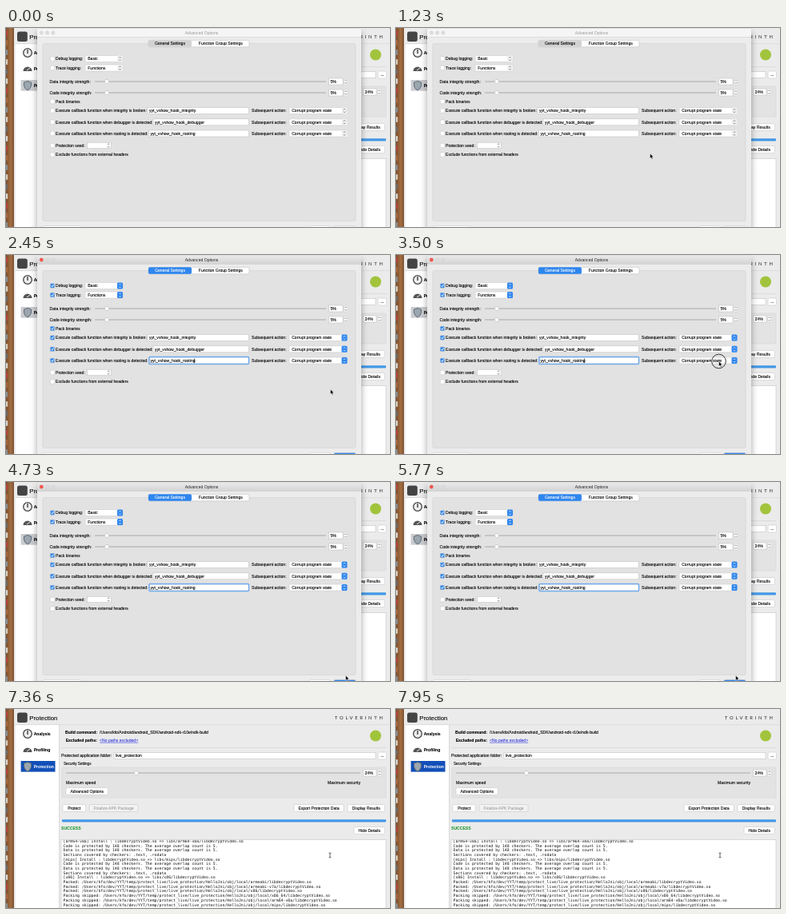
An HTML page for the animation above (8 s loop, 480 by 249 pixels).

```html
<!DOCTYPE html>
<html lang="en">
<head>
<meta charset="utf-8">
<title>Protection settings</title>
<style>
html, body { margin: 0; width: 100%; height: 100%; overflow: hidden; background: #ebebeb; }
svg { display: block; width: 100vw; height: 100vh; }
text { font: 5.1px "Liberation Sans", Arial, sans-serif; fill: #000; stroke: #000; stroke-width: .1; white-space: pre; }
.bold { font-weight: bold; }
.big { font-size: 7.8px; }
.small { font-size: 4.6px; }
.dim { fill: #8c8c8c; stroke: none; }
.link { fill: #0a14d8; stroke: none; text-decoration: underline; }
.success { font-weight: bold; fill: #0c8f20; stroke: none; }
.brand { font: 400 5.8px Lato, sans-serif; letter-spacing: 2.75px; fill: #222; stroke: none; }
.log { font: 4.87px "DejaVu Sans Mono", monospace; fill: #111; stroke: none; }
.field { fill: #fff; stroke: #c4c4c4; stroke-width: .6; }
.mark, .caret { fill: none; stroke: #fff; stroke-width: 1; }
.caret { stroke: #111; stroke-width: .6; }
.accent { fill: #f1f1f1; }
.active .accent, .active .set .box { fill: #2f86ee; }
.arrow { fill: none; stroke: #666; stroke-width: .7; }
.active .accent + .arrow { stroke: #fff; }
.box { fill: #fff; stroke: #bdbdbd; stroke-width: .5; }
.mark, #focus { display: none; }
.active .set .mark, .active #focus { display: inline; }
.tab { fill: #d2d2d2; }
.active .tab { fill: #2f86ee; }
.active .tabtext { fill: #fff; stroke: #fff; }
.bar { fill: #f5f5f5; }
.active .bar { fill: url(#titlebar); }
.title { fill: #999; stroke: none; }
.active .title { fill: #222; }
.light { fill: #dcdcdc; stroke: #c4c4c4; stroke-width: .3; }
.active .close { fill: #f4574f; stroke: #d9453e; }
.focus { fill: none; stroke: #72abec; stroke-width: 1.5; }
.pick { fill: #c9cbce; }
.front .pick { fill: #124fb8; }
.front .picktext { fill: #fff; stroke: none; }
</style>
</head>
<body>
<svg viewBox="0 0 480 249">
  <defs>
    <linearGradient id="titlebar" x2="0" y2="1"><stop stop-color="#e9e9e9"/><stop offset="1" stop-color="#d3d3d3"/></linearGradient>
    <linearGradient id="wood"><stop stop-color="#7a4d2c"/><stop offset=".6" stop-color="#a46f43"/><stop offset="1" stop-color="#7b5031"/></linearGradient>
    <clipPath id="logclip"><path d="M69 164H475V249H69Z"/></clipPath>
    <filter id="shadow" x="-10%" y="-10%" width="120%" height="125%"><feDropShadow dx="0" dy="4" stdDeviation="4.5" flood-opacity=".36"/></filter>
  </defs>
  <g id="main"></g>
  <g id="dialog"></g>
  <g id="pointer">
    <circle id="ring" r="8.8" fill="none" stroke="#333" stroke-width="1"/>
    <path id="arrow" d="M0 0V6.3L1.5 5L2.5 7.3L3.6 6.8L2.6 4.6H4.5Z" fill="#000" stroke="#fff" stroke-width=".5"/>
    <path id="beam" d="M-1.5-3Q0-3 0-2Q0-3 1.5-3M0-2V2M-1.5 3Q0 3 0 2Q0 3 1.5 3" fill="none" stroke="#222" stroke-width=".7"/>
  </g>
</svg>
<script>
const LOOP = 8000;
const $ = id => document.getElementById(id);

const rect = (x, y, w, h, fill, r = 0, more = '') =>
  `<rect x="${x}" y="${y}" width="${w}" height="${h}" rx="${r}" fill="${fill}" ${more}/>`;
const esc = s => s.replace(/</g, '&lt;').replace(/>/g, '&gt;');
// y is the vertical middle of the text
const text = (x, y, s, cls = '', anchor = 'start') =>
  `<text x="${x}" y="${y + 1.8}" class="${cls}" text-anchor="${anchor}">${esc(s)}</text>`;
const field = (x, y, w, s = '', h = 8) =>
  rect(x, y - h / 2, w, h, '', 0, 'class="field"') + text(x + 2, y, s);
const button = (x, y, w, s, cls = '') =>
  rect(x, y - 4.5, w, 9, cls ? '#f2f2f2' : '#fff', 1.6, 'stroke="#cacaca" stroke-width=".6"') +
  text(x + w / 2, y, s, cls, 'middle');
const chevrons = (x, y) => `<path class="arrow" d="M${x - 1.3} ${y - 1}l1.3-1.4 1.3 1.4m0 2l-1.3 1.4-1.3-1.4"/>`;
const stepper = (x, y) => rect(x, y - 4, 4.6, 8, '#fff', 1.5, 'stroke="#c5c5c5" stroke-width=".5"') + chevrons(x + 2.3, y);
const popup = (x, y, w, s) =>
  rect(x, y - 4, w, 8, '#fff', 1.5, 'stroke="#c5c5c5" stroke-width=".5"') +
  rect(x + w - 7, y - 4, 7, 8, '', 1.5, 'class="accent"') + chevrons(x + w - 3.5, y) + text(x + 3.2, y, s);
const slider = (x1, x2, y, knob) =>
  rect(x1, y - .5, x2 - x1, 1, '#a9a9a9', .5) +
  `<circle cx="${knob}" cy="${y}" r="2.6" fill="#fff" stroke="#b0b0b0" stroke-width=".5"/>`;
const check = (y, s, set = true) =>
  `<g class="${set ? 'set' : ''}">${rect(55.3, y - 2.7, 5.4, 5.4, '', 1, 'class="box"')}
   <path class="mark" d="M56.6 ${y}l1.1 1.4 1.9-2.9"/></g>` + text(62, y, s);

function logLines() {
  const lib = 'libdecryptVideo.so';
  const path = '/Users/kfo/dev/YYT/temp/protect_live/live_protection/HelloJni/obj/local/';
  const install = abi => `[${abi}] Install : ${lib} => libs/${abi}/${lib}`;
  const stats = [
    ...['Code', 'Data'].map(s => `${s} is protected by 148 checkers. The average overlap count is 5.`),
    'Sections covered by checkers: .text, .rodata'
  ];
  return [
    install('arm64-v8a'), ...stats, install('mips'), ...stats, install('x86'),
    ...['armeabi', 'armeabi-v7a', 'x86'].map(a => `Packed: ${path}${a}/${lib}`),
    ...['x86_64', 'arm64-v8a', 'mips'].map(a => `Packing skipped: ${path}${a}/${lib}`)
  ];
}

function dock() {
  const tints = ['#b5453b', '#d9d4cc', '#6f6a66', '#d8cdbb', '#8a8f92', '#a8683f'];
  return rect(0, 0, 10, 249, 'url(#wood)') +
    Array.from({ length: 21 }, (_, i) => rect(0, 3 + i * 12, 2.2, 7, tints[i * 5 % 6], 1)).join('');
}

function mainWindow() {
  return dock() +
    rect(10, 0, 470, 249, '#ebebeb') + rect(12, 20, 54, 229, '#fff') +
    rect(66, 20, .6, 229, '#cfcfcf') + rect(10, 19.5, 470, .6, '#d2d2d2') +
    rect(14, 4.5, 12.8, 12.5, '#444', 2.5) + text(29.3, 11.8, 'Protection', 'big') +
    text(411, 11.5, 'TOLVERINTH', 'brand') +
    '<circle cx="27" cy="31" r="5.3" fill="#eee" stroke="#444" stroke-width="1.3"/><path d="M27 32V27" stroke="#333" stroke-width="1.3"/>' +
    text(34.7, 31, 'Analysis', 'bold') +
    '<path d="M21.5 54A5.5 5.5 0 0 1 32.5 54Z" fill="#555"/><path d="M26 53L30 50" stroke="#fff" stroke-width=".9"/>' +
    text(34.7, 51.5, 'Profiling', 'bold') +
    rect(18.6, 65, 42.9, 13.6, '', 0, 'class="pick"') +
    '<path d="M27 66.5L31.5 68V72Q31 76 27 78Q23 76 22.5 72V68Z" fill="#9ca6af" stroke="#596570" stroke-width=".9"/>' +
    text(34.7, 72, 'Protection', 'bold picktext') +
    text(114, 29.5, 'Build command:', 'bold', 'end') +
    text(117, 29.5, '/Users/kfo/Android/android_SDK/android-ndk-r10e/ndk-build') +
    text(114, 39, 'Excluded paths:', 'bold', 'end') + text(117, 39, '<No paths excluded>', 'link') +
    '<circle cx="462" cy="33.5" r="7" fill="#a2c43d"/>' +
    rect(69, 48, 406, .6, '#d0d0d0') +
    text(69, 58.5, 'Protected application folder:') + field(135, 58.5, 327, 'live_protection') + button(465, 58.5, 10.5, '...') +
    text(72, 67.8, 'Security Settings', 'small') +
    rect(70, 73, 405, 38, '#e3e3e3', 1.5, 'stroke="#d3d3d3" stroke-width=".6"') +
    slider(75, 443, 80, 163) + field(446.5, 80, 16.5, '24%') + stepper(464.5, 80) +
    text(75, 92, 'Maximum speed') + text(443, 92, 'Maximum security', '', 'end') +
    button(75, 103, 52.5, 'Advanced Options') +
    button(71, 124, 28.5, 'Protect') + button(104, 124, 61, 'Finalize APK Package', 'dim') +
    button(360, 124, 62, 'Export Protection Data') + button(427, 124, 46.5, 'Display Results') +
    rect(70, 138.2, 405, 3.2, '#4398e6', 1) +
    text(69, 149.5, 'SUCCESS', 'success') + button(435, 152, 38.5, 'Hide Details') +
    rect(69, 163.3, 406, 90, '#fff', 0, 'stroke="#c4c4c4" stroke-width=".6"') +
    '<g clip-path="url(#logclip)"><g id="log">' +
    logLines().map((s, i) => text(71.5, 167 + i * 5.69, s, 'log')).join('') + '</g></g>';
}

function callbackRow(y, event, x, hook) {
  return check(y, `Execute callback function when ${event}:`) +
    field(x, y, 303.5 - x, hook) + text(307, y, 'Subsequent action:') +
    popup(354, y, 72.5, 'Corrupt program state');
}

function dialogWindow() {
  const strength = (y, s) => text(54.6, y, s) + slider(111, 400, y, 126) + field(403.5, y, 17.5, '5%') + stepper(422.5, y);
  return `<g filter="url(#shadow)">${rect(39, 1, 405, 260, '#ececec', 2.5)}</g>` +
    rect(39, 1, 405, 10.5, '', 2.5, 'class="bar"') + rect(39, 11.2, 405, .5, '#c9c9c9') +
    [44.3, 51.6, 58.9].map((x, i) => `<circle cx="${x}" cy="6" r="2.2" class="light ${i ? '' : 'close'}"/>`).join('') +
    text(244.5, 6, 'Advanced Options', 'title', 'middle') +
    rect(46, 19.5, 391, 222, '#e2e2e2', 2, 'stroke="#d1d1d1" stroke-width=".6"') +
    rect(178, 15.3, 126, 8.5, '#fff', 1.8, 'stroke="#c0c0c0" stroke-width=".6"') +
    rect(178, 15.3, 54, 8.5, '', 1.8, 'class="tab"') +
    text(205, 19.5, 'General Settings', 'tabtext', 'middle') + text(268.3, 19.5, 'Function Group Settings', '', 'middle') +
    check(38.5, 'Debug logging:') + popup(99, 38.5, 47, 'Basic') +
    check(50, 'Trace logging:') + popup(99, 50, 47, 'Functions') +
    strength(67, 'Data integrity strength:') + strength(81, 'Code integrity strength:') +
    check(92, 'Pack binaries') +
    callbackRow(103.5, 'integrity is broken', 177, 'yyt_vshow_hook_integrity') +
    callbackRow(117.8, 'debugger is detected', 184, 'yyt_vshow_hook_debugger') +
    callbackRow(132, 'rooting is detected', 178.5, 'yyt_vshow_hook_rooting') +
    `<g id="focus">${rect(179, 127.6, 124.5, 8.8, '', 1, 'class="focus"')}<path id="caret" class="caret" d="M235.6 129.3V134.8"/></g>` +
    check(147, 'Protection seed:', false) + field(101.5, 147, 30, '', 7.5) + chevrons(128.3, 147) +
    check(158.5, 'Exclude functions from external headers', false) +
    button(46, 252, 48, '') + button(379, 252, 26, '') +
    rect(410, 247.5, 27, 9, '', 1.6, 'class="accent" stroke="#c2c2c2" stroke-width=".5"');
}

$('main').innerHTML = mainWindow();
$('dialog').innerHTML = dialogWindow();

// Hard cuts: pointer appears, options are set, dialog is gone
const APPEAR = 400, SET = 2050, CLOSE = 6000;
// Pointer stops: time, x, y
const stops = [
  [0, 317.5, 157], [SET - 1, 317.5, 157], [SET, 372, 150], [2400, 405.5, 168], [2800, 405.5, 168],
  [3300, 403.5, 133], [3650, 403.5, 133], [4500, 424.5, 242], [CLOSE - 1, 424.5, 242],
  [CLOSE, 417, 242], [6500, 417, 242], [7300, 405, 183], [LOOP, 405, 183]
];
const presses = [[3400, 3620], [5850, CLOSE]];

const clamp = v => Math.min(1, Math.max(0, v));
const smooth = v => v * v * (3 - 2 * v);
const show = (id, on) => { $(id).style.display = on ? '' : 'none'; };

function pointerAt(t) {
  const i = stops.findIndex(s => s[0] > t);
  const [a, b] = [stops[i - 1], stops[i]];
  const p = smooth((t - a[0]) / (b[0] - a[0]));
  return [a[1] + (b[1] - a[1]) * p, a[2] + (b[2] - a[2]) * p];
}

function render(t) {
  $('pointer').setAttribute('transform', `translate(${pointerAt(t)})`);
  show('pointer', t >= APPEAR);
  show('ring', presses.some(([from, to]) => t >= from && t < to));
  show('arrow', t < CLOSE);
  show('beam', t >= CLOSE);

  show('dialog', t < CLOSE);
  $('dialog').classList.toggle('active', t >= SET);
  $('main').classList.toggle('front', t >= CLOSE);
  show('caret', t < 4100);
  $('log').setAttribute('transform', `translate(0 ${-1.9 * smooth(clamp((t - 6600) / 400))})`);
}

const start = performance.now();
function tick() {
  render((performance.now() - start) % LOOP);
  requestAnimationFrame(tick);
}
tick();
</script>
</body>
</html>
```
